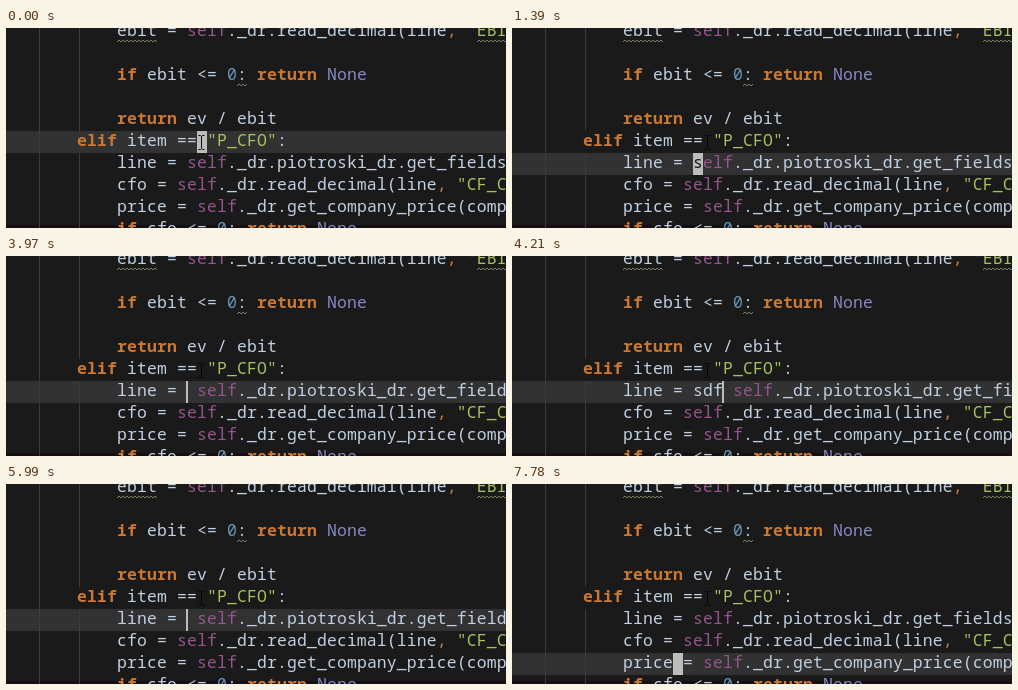
Write an HTML page that moves like this. It is 500x200 px and loops after 8 s.

```html
<!DOCTYPE html>
<html lang="en">
<head>
<meta charset="utf-8">
<title>Editor caret</title>
<style>
html, body { margin: 0; width: 100%; height: 100%; overflow: hidden; background: #1a1a1a; }
svg { display: block; width: 500px; height: 200px; }
text { font: 16.4px "Noto Sans Mono", "DejaVu Sans Mono", monospace; letter-spacing: .16px; white-space: pre; fill: #c0d0e2; font-variant-ligatures: none; }
.kw { fill: #cc7832; font-weight: 700; }
.self { fill: #94558d; }
.none { fill: #8888c6; }
.str { fill: #a5c261; }
.num { fill: #6897bb; }
.comma { fill: #cc7832; }
.dark { fill: #1a1a1a; }
.wave { fill: none; stroke: #77805f; stroke-width: 1; }
</style>
</head>
<body>
<svg id="stage" viewBox="0 0 500 200" xmlns="http://www.w3.org/2000/svg">
  <rect width="500" height="200" fill="#1a1a1a"/>
  <rect y="197" width="500" height="3" fill="#150f11"/>
  <rect id="band" width="500" height="22" fill="#323232"/>
  <path d="M33.5 0V200M73.5 0V103M73.5 125V200" stroke="#3b3b3b"/>
  <g id="marks"></g>
  <g id="code"></g>
  <g id="waves" class="wave"></g>
  <rect id="bar" width="2" height="22" fill="#bcbcbc"/>
  <path d="M192.5 107.5h2l1 1 1-1h2M195.5 108.5v12M192.5 121.5h2l1-1 1 1h2" fill="none" stroke="#050505"/>
</svg>
<script>
const LOOP = 8000, CELL = 10, ROW = 22, LEFT = 111;
const BLOCK = '#bcbcbc', USAGE = '#344134', WARN = '#52503a';
const LINE = 6, CFO = 7, PRICE = 8;

const lines = [
  'ebit = self._dr.read_decimal(line, "EBIT")',
  '',
  'if ebit <= 0: return None',
  '',
  'return ev / ebit',
  'elif item == "P_CFO":',
  'line = self._dr.piotroski_dr.get_fields(',
  'cfo = self._dr.read_decimal(line, "CF_CFO")',
  'price = self._dr.get_company_price(company)',
  'if cfo <= 0: return None'
];

const $ = id => document.getElementById(id);
const rowTop = r => r * ROW - 7;
const rowLeft = r => r === 5 ? LEFT - 4 * CELL : LEFT;

function add(parent, tag, attrs) {
  const el = document.createElementNS('http://www.w3.org/2000/svg', tag);
  for (const k in attrs) el.setAttribute(k, attrs[k]);
  return parent.appendChild(el);
}

// One class name per character
function classify(src) {
  const out = Array(src.length).fill('');
  const re = /(?<str>"[^"]*"?)|\b(?<kw>if|elif|return)\b|\b(?<self>self)\b|\b(?<none>None)\b|\b(?<num>\d+)\b|(?<comma>,)/g;
  for (const m of src.matchAll(re)) {
    const cls = Object.keys(m.groups).find(k => m.groups[k] !== undefined);
    out.fill(cls, m.index, m.index + m[0].length);
  }
  return out;
}

const texts = lines.map((_, r) =>
  add($('code'), 'text', { x: rowLeft(r), y: rowTop(r) + 15 }));

function setRow(r, src, darkCol) {
  const cls = classify(src);
  if (darkCol >= 0 && darkCol < src.length) cls[darkCol] = 'dark';
  texts[r].textContent = '';
  for (let i = 0, j; i < src.length; i = j) {
    for (j = i + 1; j < src.length && cls[j] === cls[i]; j++);
    add(texts[r], 'tspan', { class: cls[i] }).textContent = src.slice(i, j);
  }
}

// Columns are counted from LEFT on every row
function mark(r, col, count, fill) {
  add($('marks'), 'rect', {
    x: LEFT + col * CELL, y: rowTop(r), width: count * CELL, height: ROW, fill
  });
}

function wave(r, col, count) {
  let d = `M${LEFT + col * CELL} ${rowTop(r) + 21}`;
  for (let i = 0; i < count * CELL; i += 2) d += `l2 ${i % 4 ? 2 : -2}`;
  add($('waves'), 'path', { d });
}
wave(0, 0, 4);
wave(0, 36, 3);
wave(2, 12, 1);

const block = (row, col, more) => ({ row, col, typed: '', ...more });
const insert = (typed, more) => ({ row: LINE, col: 6 + typed.length, typed, bar: true, ...more });

// Start time and editor state
const steps = [
  [0, block(5, 8)],
  [300, block(LINE, 8)],
  [540, block(CFO, 8)],
  [780, block(PRICE, 8)],
  [1010, block(CFO, 8)],
  [1160, block(LINE, 8)],
  [1390, block(LINE, 7)],
  [1710, block(LINE, 7, { usages: true })],
  [2090, block(LINE, 7)],
  [2400, block(LINE, 8, { from: 7 })],
  [2810, block(LINE, 7)],
  [2890, block(LINE, 6)],
  [3040, insert('')],
  [3340, insert('', { hidden: true })]
];
const keys = (start, gap, ...states) =>
  states.forEach((s, i) => steps.push([start + i * gap, insert(s)]));
keys(3970, 80, ' ', ' s', ' sd', ' sdf', ' sdf ');
keys(4520, 310, ' sdf s', ' sdf sd');
keys(4910, 220, ' sdf sdf', ' sdf sd');
steps.push([5210, insert(' sdf s', { warn: true })]);
keys(5290, 80, ' sdf ', ' sdf', ' sd');
keys(5760, 230, ' s', ' ');
steps.push(
  [6390, insert('')],
  [7170, block(LINE, 5)],
  [7550, block(CFO, 5)],
  [7780, block(PRICE, 5)]
);

function draw(s) {
  $('marks').textContent = '';
  $('band').setAttribute('y', rowTop(s.row));
  if (s.usages) lines.forEach((src, r) => {
    const at = src.indexOf('self');
    if (at >= 0) mark(r, at, 4, USAGE);
  });
  if (s.warn) mark(LINE, s.col - 1, 1, WARN);
  if (!s.bar) {
    const from = s.from ?? s.col;
    mark(s.row, from, s.col - from + 1, BLOCK);
  }

  const indent = (LEFT - rowLeft(s.row)) / CELL;
  lines.forEach((src, r) => {
    if (r === LINE) src = src.slice(0, 6) + s.typed + src.slice(6);
    setRow(r, src, r === s.row && !s.bar ? s.col + indent : -1);
  });

  const bar = $('bar');
  bar.setAttribute('x', LEFT + s.col * CELL - 1);
  bar.setAttribute('y', rowTop(s.row));
  bar.setAttribute('visibility', s.bar && !s.hidden ? 'visible' : 'hidden');
}

let shown;
function render(now) {
  const t = now % LOOP;
  let state = steps[0][1];
  for (const [at, s] of steps) if (t >= at) state = s;
  if (state !== shown) draw(shown = state);
}

const start = performance.now();
function tick() {
  render(performance.now() - start);
  requestAnimationFrame(tick);
}
tick();
</script>
</body>
</html>
```
